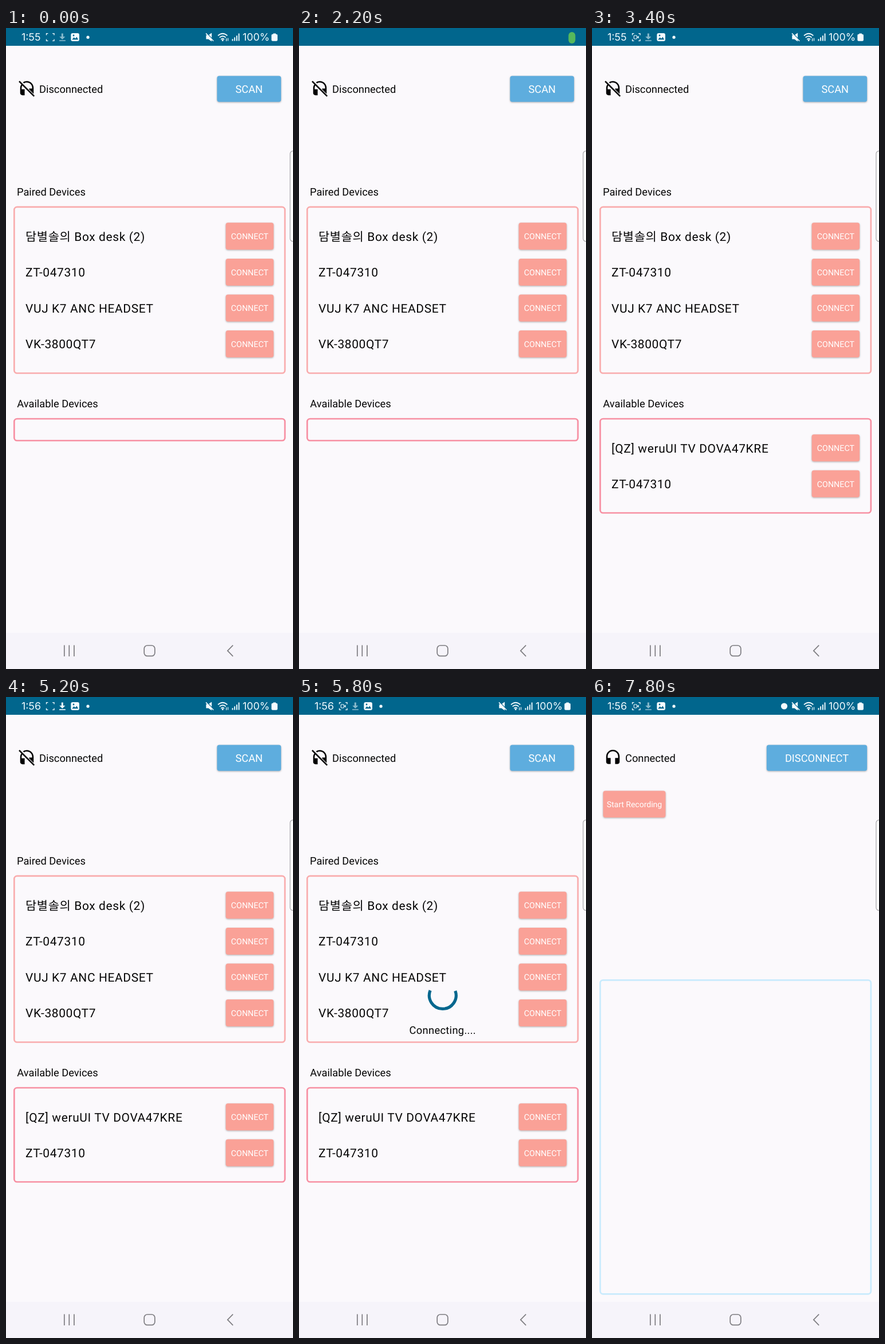
Write an HTML page that moves like this. It is 501x1117 px and loops after 8 s.

```html
<!DOCTYPE html>
<html lang="en">
<head>
<meta charset="utf-8">
<title>Headset connection</title>
<style>
  html, body { margin: 0; width: 100%; height: 100%; overflow: hidden; background: #fbf9fc; }
  svg { display: block; width: 100vw; height: 100vh; font-family: Roboto, "Noto Sans CJK KR", "Noto Sans CJK", sans-serif; }
  text { text-rendering: geometricPrecision; }
  .label { font-size: 18.27px; fill: #050505; }
  .name { font-size: 20.88px; letter-spacing: .65px; fill: #050505; }
  .small { font-size: 14.3px; fill: #fff; text-anchor: middle; }
  .big { font-size: 18.27px; fill: #fff; text-anchor: middle; }
  .btn { filter: drop-shadow(0 1.2px 1.5px rgba(0, 0, 0, .3)); }
  .frame { fill: none; stroke-width: 2.7; }
  .bar { font: 17.8px Inter, sans-serif; fill: #f4fbff; }
  .line { fill: none; stroke: #f4fbff; }
  .nav { fill: none; stroke: #7d7c80; stroke-width: 1.7; }
</style>
</head>
<body>
<svg viewBox="0 0 501 1117" preserveAspectRatio="none">
  <rect width="501" height="1117" fill="#fbf9fc"/>
  <rect width="501" height="31" fill="#01668d"/>
  <rect y="1054" width="501" height="63" fill="#f6f4fa"/>

  <g id="status" stroke-width="1.4">
    <text id="clock" class="bar" x="27" y="22.4"></text>
    <path class="line" stroke-width="1.3" d="M70.5 12.6V9.7H73.4M81.1 9.7H84V12.6M84 19.5V22.4H81.1M73.4 22.4H70.5V19.5"/>
    <g id="camera">
      <rect class="line" x="73.2" y="13" width="5.2" height="6" rx="1.2" stroke-width="1.1"/>
      <path d="M79.2 15.4 81.6 13.6V18.4L79.2 16.6Z" fill="#f4fbff"/>
    </g>
    <g id="download" fill="#f4fbff">
      <path d="M96.8 9.5h3v5.4h3.6L98.3 20l-5.1-5.1h3.6z"/>
      <rect x="93" y="21.2" width="10.8" height="1.6"/>
    </g>
    <rect x="113.3" y="9" width="14.6" height="14" rx="3" fill="#f4fbff"/>
    <path d="M115.2 20.3 118.6 16.2 120.9 18.6 123.4 15.4 126.1 20.3Z" fill="#01668d"/>
    <circle cx="118" cy="13" r="1.4" fill="#01668d"/>
    <circle cx="143" cy="16.2" r="2.6" fill="#f4fbff"/>

    <circle id="link" cx="335.5" cy="16" r="5.6" fill="#f4fbff"/>
    <path d="M349.3 12.6h4l5.8-4v15l-5.8-4h-4z" fill="#f4fbff"/>
    <path d="M349.8 8.6 363 22" stroke="#01668d" stroke-width="1.4"/>
    <path class="line" stroke-width="1.6" d="M349 9.4 362.2 22.8"/>
    <path class="line" stroke-width="1.7" d="M370 13.4q8.2-7.3 16.4 0M372.7 16.7q5.5-4.9 11 0M375.3 19.8q2.9-2.6 5.8 0"/>
    <circle cx="378.2" cy="21.6" r="1.5" fill="#f4fbff"/>
    <path class="line" stroke-width="1.2" d="M384.6 23v-5M387.5 17.5v5"/>
    <path class="line" stroke-width="1.9" d="M395.5 22.6v-3.4M399.2 22.6v-6.4M402.9 22.6v-9.4M406.6 22.6V9.6"/>
    <text class="bar" x="413" y="22.4">100%</text>
    <path d="M466.4 9.4h4.6v1.4h1q2 0 2 2v8q0 2-2 2h-6.6q-2 0-2-2v-8q0-2 2-2h1z" fill="#f4fbff"/>
  </g>
  <rect id="chip" fill="#55b85c"/>

  <g id="lists">
    <g transform="translate(20.8 89.8) scale(1.305)">
      <path d="M12 4c3.9 0 7 3.1 7 7v1h-4v1.2l6 6V11c0-5-4-9-9-9-2 0-3.8.6-5.3 1.7l1.5 1.4C9.2 4.4 10.5 4 12 4zM2.4 1.6 1 3l3.6 3.6C3.6 7.9 3 9.4 3 11v7c0 1.7 1.3 3 3 3h3v-8H5v-2c0-1.1.3-2.1.9-3L21 23l1.4-1.4z"/>
    </g>
    <text class="label" x="58" y="113.4">Disconnected</text>
    <text class="label" x="19" y="292.4">Paired Devices</text>
    <text class="label" x="19.3" y="661.2">Available Devices</text>
    <rect class="frame" x="14.3" y="311.9" width="472.6" height="289.6" rx="5" stroke="#f9acad"/>
    <rect class="frame" id="found" x="14.3" y="681" width="472.6" rx="5" stroke="#f78fa2"/>
    <g id="rows"></g>
    <g id="busy">
      <path id="arc" fill="none" stroke="#04678e" stroke-width="5.2"/>
      <text class="label" x="250.8" y="587" text-anchor="middle" letter-spacing=".33">Connecting....</text>
    </g>
  </g>

  <g id="linked">
    <g transform="translate(20.8 90.7) scale(1.305)">
      <path d="M12 1a9 9 0 0 0-9 9v7c0 1.66 1.34 3 3 3h3v-8H5v-2c0-3.87 3.13-7 7-7s7 3.13 7 7v2h-4v8h3c1.66 0 3-1.34 3-3v-7a9 9 0 0 0-9-9z"/>
    </g>
    <text class="label" x="58" y="113.4">Connected</text>
    <rect class="frame" x="14.3" y="493.3" width="472.6" height="547" rx="5" stroke="#c9ebfd"/>
  </g>

  <rect x="496" y="214.3" width="20" height="157.6" rx="5" fill="#fff" stroke="#aaa9ac" stroke-width="1.3"/>
  <g class="nav">
    <path d="M101.8 1075.5v19.5M110.3 1075.5v19.5M118.9 1075.5v19.5"/>
    <rect x="241.2" y="1076" width="18.6" height="18.4" rx="5.5"/>
    <path d="M396.2 1075.6 386.8 1085.2 396.2 1094.8"/>
  </g>
</svg>
<script>
const $ = id => document.getElementById(id);
const LOOP = 8000, STEP = 200;
const BUSY_FROM = 5473, LINKED_FROM = 6200;
const BLUE = '#5eadde', SALMON = '#faa197';

function add(parent, tag, attrs, text) {
  const el = document.createElementNS('http://www.w3.org/2000/svg', tag);
  for (const k in attrs) el.setAttribute(k, attrs[k]);
  if (text) el.textContent = text;
  return parent.appendChild(el);
}

function button(parent, x, y, width, height, fill, cls, label, size) {
  add(parent, 'rect', { class: 'btn', x, y, width, height, rx: 4, fill });
  const t = add(parent, 'text', { class: cls, x: x + width / 2, y: y + height / 2 + (cls === 'big' ? 7.2 : 5.2) }, label);
  if (size) t.style.fontSize = size + 'px';
}

function row(y, label) {
  const g = add($('rows'), 'g', {});
  add(g, 'text', { class: 'name', x: 34, y: y + 7.3 }, label);
  button(g, 383.6, y - 24, 83.6, 47, SALMON, 'small', 'CONNECT');
  return g;
}

button($('lists'), 368.4, 83.4, 111.8, 45.4, BLUE, 'big', 'SCAN');
button($('linked'), 304.8, 83.4, 175.4, 45.4, BLUE, 'big', 'DISCONNECT');
button($('linked'), 19.4, 163.4, 109, 46.6, SALMON, 'small', 'Start Recording', 14);

['담별솔의 Box desk (2)', 'ZT-047310', 'VUJ K7 ANC HEADSET', 'VK-3800QT7']
  .forEach((name, i) => row(363.3 + 62.6 * i, name));
const found = ['[QZ] weruUI TV DOVA47KRE', 'ZT-047310']
  .map((name, i) => row(732.2 + 62.6 * i, name));

const clamp = v => Math.max(0, Math.min(1, v));
const show = (el, on) => el.setAttribute('display', on ? 'inline' : 'none');
const set = (el, attrs) => { for (const k in attrs) el.setAttribute(k, attrs[k]); };

// Cubic Bezier (0.4, 0, 0.2, 1), solved by bisection
function ease(x) {
  let lo = 0, hi = 1;
  for (let i = 0; i < 20; i++) {
    const s = (lo + hi) / 2, r = 1 - s;
    if (1.2 * r * r * s + 0.6 * r * s * s + s * s * s < x) lo = s; else hi = s;
  }
  return lo * lo * (3 - 2 * lo);
}

function spinner(t) {
  const p = t % 1332, turn = Math.floor(t / 1332) * 216;
  const head = 290 * ease(clamp(p / 666)), tail = 290 * ease(clamp((p - 666) / 666));
  const base = -90 + turn + 286 * p / 1332;
  const at = deg => {
    const a = deg * Math.PI / 180;
    return (250.8 + 23.4 * Math.cos(a)).toFixed(2) + ' ' + (520 + 23.4 * Math.sin(a)).toFixed(2);
  };
  const large = head - tail > 180 ? 1 : 0;
  $('arc').setAttribute('d', `M${at(base + tail)}A23.4 23.4 0 ${large} 1 ${at(base + head)}`);
}

function draw(time) {
  const t = Math.floor(time % LOOP / STEP) * STEP;
  const phase = t % 1200, linked = t >= LINKED_FROM;

  $('clock').textContent = t < 4400 ? '1:55' : '1:56';
  $('status').setAttribute('opacity', t < 200 ? 1 : clamp((t - 2200) / 400));
  show($('camera'), phase >= 600);
  $('download').setAttribute('opacity', phase === 200 || phase === 400 ? 1 : 0.55);
  show($('link'), linked);

  // The privacy chip opens, holds, then shrinks
  const open = t < 2200 ? ease(clamp((t - 200) / 600)) : 0;
  const w = 12 + 28 * open, h = 20 + 4 * open;
  set($('chip'), { x: 482.4 + 2 * open - w, y: 17 - h / 2 - open, width: w, height: h, rx: Math.min(w, h) / 2 });
  show($('chip'), t >= 200 && t <= 2200);

  const count = t < 2800 ? 0 : t < 3400 ? 1 : 2;
  found.forEach((g, i) => show(g, i < count));
  $('found').setAttribute('height', 38 + 63 * count);

  const busy = t >= BUSY_FROM && !linked;
  show($('busy'), busy);
  if (busy) spinner(t - BUSY_FROM);
  show($('lists'), !linked);
  show($('linked'), linked);
}

const start = performance.now();
function tick() {
  draw(performance.now() - start);
  requestAnimationFrame(tick);
}
tick();
</script>
</body>
</html>
```
